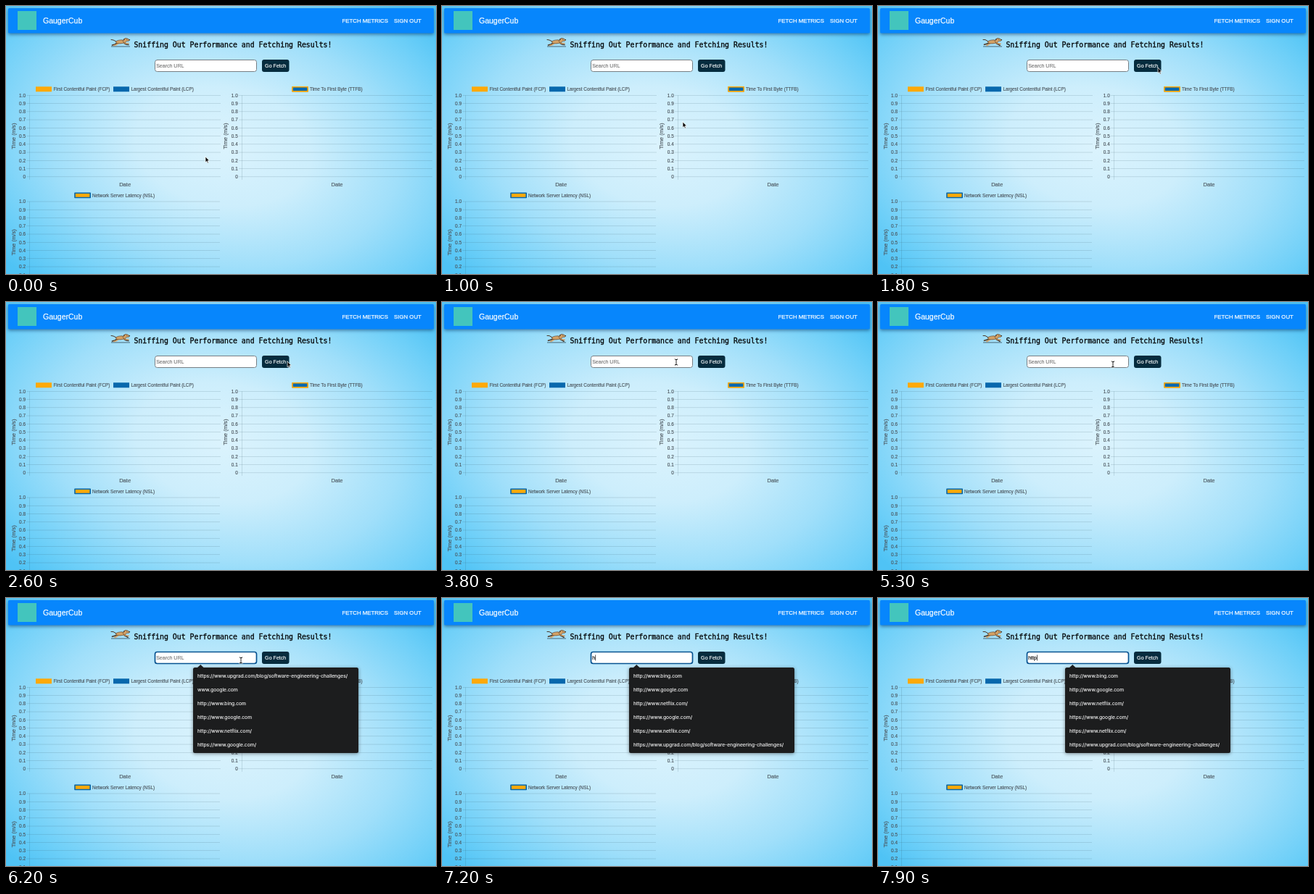
Recreate the animation shown at these times as an HTML page with a canvas. Size 593 by 370 pixels, loop 8000 ms.

```html
<!DOCTYPE html>
<html lang="en">
<head>
<meta charset="utf-8">
<title>Performance dashboard</title>
<style>
html, body { margin: 0; width: 100%; height: 100%; overflow: hidden; background: #5cc9f7; }
canvas { display: block; width: 593px; height: 370px; }
</style>
</head>
<body>
<canvas id="stage"></canvas>
<script>
const W = 593, H = 370, LOOP = 8000;
const canvas = document.getElementById('stage');
const ratio = window.devicePixelRatio || 1;
canvas.width = Math.round(W * ratio);
canvas.height = Math.round(H * ratio);
const ctx = canvas.getContext('2d');

const SANS = '"Liberation Sans", Arial, sans-serif';
const MONO = '"DejaVu Sans Mono", monospace';
const UI = 'Inter, sans-serif';
const ORANGE = '#ffa908', BLUE = '#0768ad';
const LABEL = '#4b555c', GRID = 'rgba(45,75,90,.25)';

const OPEN_AT = 5800;
const KEYS_AT = [7100, 7300, 7500, 7700];
const LONG_URL = 'https://www.upgrad.com/blog/software-engineering-challenges/';
const RECENT = [LONG_URL, 'www.google.com', 'http://www.bing.com',
  'http://www.google.com', 'http://www.netflix.com/', 'https://www.google.com/'];
const MATCHES = ['http://www.bing.com', 'http://www.google.com', 'http://www.netflix.com/',
  'https://www.google.com/', 'https://www.netflix.com/', LONG_URL];

// time, x, y
const POINTER = [
  [0, 275, 208], [1000, 332, 160], [1800, 386, 85], [2600, 388, 82],
  [3000, 387, 82], [3600, 323, 83], [3900, 323, 83], [5000, 324, 86]
];

// A hairline stroke gives the slightly heavy look of smoothed type.
function text(str, x, y, size, color, font = SANS, align = 'left', weight = 0.15) {
  ctx.font = `${size}px ${font}`;
  ctx.fillStyle = ctx.strokeStyle = color;
  ctx.lineWidth = weight;
  ctx.lineJoin = 'round';
  ctx.textAlign = align;
  ctx.textBaseline = 'alphabetic';
  ctx.fillText(str, x, y);
  ctx.strokeText(str, x, y);
}

function rect(x, y, w, h, color) {
  ctx.fillStyle = color;
  ctx.fillRect(x, y, w, h);
}

function roundRect(x, y, w, h, r, fill, stroke, line = 1) {
  ctx.beginPath();
  ctx.roundRect(x, y, w, h, r);
  if (fill) { ctx.fillStyle = fill; ctx.fill(); }
  if (stroke) { ctx.strokeStyle = stroke; ctx.lineWidth = line; ctx.stroke(); }
}

function path(points, fill, stroke, line = 1) {
  ctx.beginPath();
  points.forEach(([x, y], i) => i ? ctx.lineTo(x, y) : ctx.moveTo(x, y));
  if (fill) { ctx.closePath(); ctx.fillStyle = fill; ctx.fill(); }
  if (stroke) { ctx.strokeStyle = stroke; ctx.lineWidth = line; ctx.stroke(); }
}

function withShadow(color, blur, dy, draw) {
  ctx.save();
  ctx.shadowColor = color;
  ctx.shadowBlur = blur * ratio;
  ctx.shadowOffsetY = dy * ratio;
  draw();
  ctx.restore();
}

function background() {
  ctx.save();
  ctx.translate(300, 194);
  ctx.rotate(0.16);
  ctx.scale(1.5, 1);
  const g = ctx.createRadialGradient(0, 0, 0, 0, 0, 272);
  g.addColorStop(0, '#dbf3fd');
  g.addColorStop(0.3, '#cdeefc');
  g.addColorStop(0.6, '#a0dffa');
  g.addColorStop(0.85, '#6dcff8');
  g.addColorStop(1, '#4fc3f5');
  rect(-450, -400, 900, 800, g);
  ctx.restore();
}

function header() {
  withShadow('rgba(0,40,90,.5)', 4, 2, () => roundRect(3, 3, 587, 34.5, 1.5, '#0786fc'));
  rect(16, 7, 26, 26, '#43c5bd');
  text('GaugerCub', 51, 23.7, 10.5, '#f4faff', SANS, 'left', 0.25);
  text('FETCH METRICS', 463.4, 22.9, 7.85, '#f4faff', SANS, 'left', 0.25);
  text('SIGN OUT', 535, 22.9, 7.85, '#f4faff', SANS, 'left', 0.25);
}

function dog(t) {
  const s = t % 500 < 200 ? 0 : 0.8;
  const tan = '#d3a165', dark = '#4b3524';
  ctx.lineCap = 'round';
  ctx.lineJoin = 'round';
  rect(145, 55.5, 26, 0.9, '#3d5966');
  path([[152, 49], [148, 47 - s / 2], [145, 46.5]], null, dark, 1);
  path([[154, 51], [150, 53 - s], [146.5, 54 - s]], null, dark, 1.6);
  path([[155, 51.5], [152, 53.5], [149 + s, 54.5]], null, tan, 1.6);
  path([[163, 51.5], [166, 53], [169 - s, 53.5 + s]], null, dark, 1.5);
  path([[162, 51], [165, 51.5], [169, 51.5 + s]], null, tan, 1.5);
  ctx.beginPath();
  ctx.ellipse(158, 49.4, 6.6, 2.5, -0.08, 0, Math.PI * 2);
  ctx.fillStyle = tan;
  ctx.fill();
  ctx.strokeStyle = dark;
  ctx.lineWidth = 0.6;
  ctx.stroke();
  path([[161, 48], [164, 44.5], [167, 44.7], [170.5, 46.7], [169.5, 48.2], [166.5, 48.5], [164, 51]], tan, dark, 0.6);
  path([[164.5, 45.2], [162, 45.6], [162.2, 47.8]], dark);
  rect(169.6, 46.1, 1.2, 1.1, '#151515');
  rect(166.4, 45.7, 0.8, 0.8, '#151515');
}

function legend(label, x, y, fill, border) {
  rect(x, y - 3.5, 22, 7, fill);
  if (border) {
    ctx.strokeStyle = border;
    ctx.lineWidth = 1.6;
    ctx.strokeRect(x + 0.4, y - 3.1, 21.2, 6.2);
  }
  text(label, x + 24.4, y + 2.2, 6.35, LABEL);
}

function chart(axis, top, right) {
  const step = 11.25, bottom = top + step * 10;
  for (let i = 0; i <= 10; i++) {
    const y = top + i * step;
    rect(axis - 4, y - 0.3, right - axis + 4, 0.6, GRID);
    const label = i === 10 ? '0' : (1 - i / 10).toFixed(1);
    text(label, axis - 5.3, y + 2.3, 6.4, LABEL, SANS, 'right');
  }
  rect(axis, top, 0.6, bottom - top + 4, GRID);
  ctx.save();
  ctx.translate(axis - 19.7, top + step * 5);
  ctx.rotate(-Math.PI / 2);
  text('Time (m/s)', 0, 0, 7.6, LABEL, SANS, 'center');
  ctx.restore();
  text('Date', (axis + right) / 2, bottom + 13, 7.6, LABEL, SANS, 'center');
}

function charts() {
  legend('First Contentful Paint (FCP)', 41, 114.8, ORANGE);
  legend('Largest Contentful Paint (LCP)', 148, 114.8, BLUE);
  legend('Time To First Byte (TTFB)', 394.6, 114.8, BLUE, ORANGE);
  legend('Network Server Latency (NSL)', 94.6, 261.4, ORANGE, BLUE);
  chart(32.3, 123.3, 296);
  chart(325, 123.3, 588);
  chart(32.3, 270, 295);
}

function searchBar(t) {
  const open = t >= OPEN_AT;
  const typed = 'http'.slice(0, KEYS_AT.filter(k => t >= k).length);
  roundRect(205.5, 74.5, 140, 16, 3, '#fff', open ? '#075391' : '#777f84', open ? 1.7 : 1);
  text(typed || 'Search URL', 207.2, 85, 7, typed ? '#111' : '#757575');
  if (typed) rect(207.5 + ctx.measureText(typed).width, 78.5, 0.7, 8, '#111');
  roundRect(353, 74, 37.5, 17, 3, '#062c3e');
  text('Go Fetch', 371.7, 85, 7.1, '#fff', SANS, 'center');
}

function dropdown(t) {
  if (t < OPEN_AT) return;
  withShadow('rgba(0,0,0,.45)', 5, 1, () => roundRect(258, 96, 228, 118, 2.5, '#1c1d1e'));
  path([[263.5, 96.5], [268.3, 92], [273, 96.5]], '#1c1d1e');
  const items = t >= KEYS_AT[0] ? MATCHES : RECENT;
  items.forEach((url, i) => text(url, 264, 110.2 + i * 19.05, 6.75, '#ececec', UI));
}

function pointerAt(t) {
  let i = 0;
  while (i < POINTER.length - 2 && t > POINTER[i + 1][0]) i++;
  const [t0, x0, y0] = POINTER[i], [t1, x1, y1] = POINTER[i + 1];
  const p = Math.min(1, Math.max(0, (t - t0) / (t1 - t0)));
  const e = p * p * (3 - 2 * p);
  return [x0 + (x1 - x0) * e, y0 + (y1 - y0) * e];
}

function pointer(t) {
  if (t >= KEYS_AT[0]) return;
  const [x, y] = pointerAt(t);
  ctx.save();
  ctx.translate(x, y);
  if (x > 205 && x < 346 && y > 74 && y < 91) {
    const beam = [[-1.8, -4], [0, -3.3], [1.8, -4], [0, -3.3], [0, 3.3], [-1.8, 4], [0, 3.3], [1.8, 4]];
    path(beam, null, '#fff', 1.8);
    path(beam, null, '#111', 0.9);
  } else {
    const arrow = [[0, 0], [0, 7.8], [1.8, 6.2], [3, 9], [4.3, 8.4], [3.1, 5.7], [5.4, 5.6], [0, 0]];
    path(arrow, '#0b0b0b', '#fff', 0.7);
  }
  ctx.restore();
}

function draw(t) {
  ctx.setTransform(ratio, 0, 0, ratio, 0, 0);
  background();
  header();
  dog(t);
  text('Sniffing Out Performance and Fetching Results!', 176.4, 56.7, 9.87, '#080c0e', MONO, 'left', 0.35);
  charts();
  searchBar(t);
  dropdown(t);
  pointer(t);
}

const start = performance.now();
function frame() {
  draw((performance.now() - start) % LOOP);
  requestAnimationFrame(frame);
}
frame();
</script>
</body>
</html>
```
